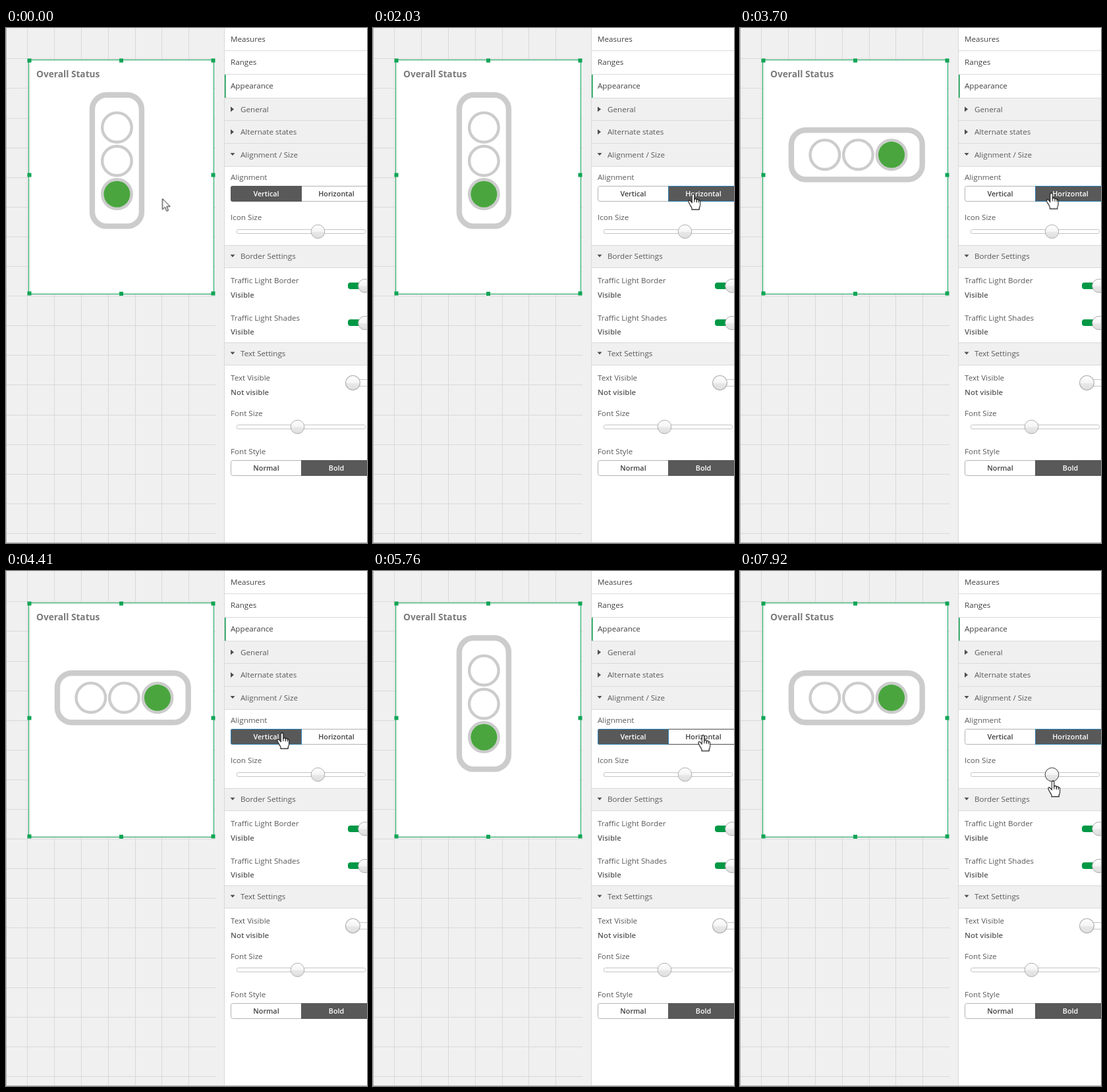
An HTML page for the animation above (8000 ms loop, 548 by 783 pixels).

```html
<!DOCTYPE html>
<html lang="en">
<head>
<meta charset="utf-8">
<title>Traffic light alignment</title>
<style>
html, body { margin: 0; width: 100%; height: 100%; overflow: hidden; background: #f0f0f0; }
svg { display: block; width: 548px; height: 783px; }
text { font: 11.65px "Open Sans", "Noto Sans", sans-serif; fill: #595959; }
.dark { fill: #404040; }
.strong { font-weight: 600; font-size: 11.4px; }
.title { font-weight: 700; font-size: 13.7px; fill: #7b7b7b; }
.btn text { font-weight: 600; font-size: 10.8px; text-anchor: middle; }
.btn .lit { fill: #fff; }
.line { fill: none; stroke: #d9d9d9; }
.band { fill: #f0f0f0; }
.box { fill: #fff; stroke: #b3b3b3; }
.fill { fill: #595959; }
.focus { fill: none; stroke: #2f83b5; }
.hover { fill: none; stroke: #4d4d4d; }
.track { fill: #fff; stroke: #c4c4c4; }
.on { fill: #009845; }
.green { fill: #4aa53f; }
.frame { fill: none; stroke: #ccc; stroke-width: 8.4; }
.lamp { fill: #fff; stroke: #ccc; stroke-width: 4.4; }

.tall, .wide, .v-on, .h-on, .v-focus, .v-hover, .h-hover, .knob-hover, .arrow, .hand {
  animation: 8s step-end infinite;
}
.tall { animation-name: tall; }
.wide { animation-name: wide; }
.v-on { animation-name: v-on; }
.h-on { animation-name: h-on; }
.v-focus { animation-name: v-focus; }
.v-hover { animation-name: v-hover; }
.h-hover { animation-name: h-hover; }
.knob-hover { animation-name: knob-hover; }
.arrow { animation-name: arrow; }
.hand { animation-name: hand; }
.cursor { animation: move 8s linear infinite; }

@keyframes tall { 0%, 58.875% { opacity: 1 } 27.25%, 79.125%, 100% { opacity: 0 } }
@keyframes wide { 0%, 58.875% { opacity: 0 } 27.25%, 79.125%, 100% { opacity: 1 } }
@keyframes v-on { 0%, 55.125% { opacity: 1 } 23.375%, 75.625%, 100% { opacity: 0 } }
@keyframes h-on { 0%, 55.125% { opacity: 0 } 23.375%, 75.625%, 100% { opacity: 1 } }
@keyframes v-focus { 0%, 75.625%, 100% { opacity: 0 } 55.125% { opacity: 1 } }
@keyframes v-hover { 0%, 55.125%, 100% { opacity: 0 } 49.8125% { opacity: 1 } }
@keyframes h-hover { 0%, 23.375%, 75.625%, 100% { opacity: 0 } 16.125%, 66.5625% { opacity: 1 } }
@keyframes knob-hover { 0% { opacity: 0 } 97.2%, 100% { opacity: 1 } }
@keyframes arrow { 0%, 88.175% { opacity: 1 } 7.0375%, 97.2%, 100% { opacity: 0 } }
@keyframes hand { 0%, 88.175% { opacity: 0 } 7.0375%, 97.2%, 100% { opacity: 1 } }

/* The pointer jumps between sampled places, at both ends of each move. */
@keyframes move {
  0% { transform: translate(237.5px, 259.5px) }
  1.625% { transform: translate(237.5px, 259.5px); animation-timing-function: steps(3, jump-both) }
  7.0375% { transform: translate(350px, 253px) }
  8.8375% { transform: translate(350px, 253px); animation-timing-function: steps(3, jump-both) }
  14.25% { transform: translate(443px, 257px) }
  16.125% { transform: translate(443px, 257px); animation-timing-function: steps(2, jump-both) }
  19.875% { transform: translate(486px, 252px) }
  46.25% { transform: translate(486px, 252px); animation-timing-function: steps(4, jump-both) }
  53.375% { transform: translate(419px, 246px) }
  64.75% { transform: translate(419px, 246px); animation-timing-function: steps(4, jump-both) }
  72% { transform: translate(501px, 249.5px) }
  86.375% { transform: translate(501px, 249.5px); animation-timing-function: steps(7, jump-both) }
  99%, 100% { transform: translate(475px, 319px) }
}
</style>
</head>
<body>
<svg viewBox="0 0 548 783">
  <defs>
    <linearGradient id="gloss" x2="0" y2="1">
      <stop offset="0" stop-color="#fff"/>
      <stop offset=".5" stop-color="#f4f4f4"/>
      <stop offset=".55" stop-color="#e8e8e8"/>
      <stop offset="1" stop-color="#dedede"/>
    </linearGradient>
    <circle id="knob" r="10.3" fill="url(#gloss)" stroke="#adadad"/>
    <rect id="handle" x="-3" y="-3" width="6" height="6" fill="#10a557"/>
    <path id="closed" d="M341 -4l5 4-5 4z" fill="#4d4d4d"/>
    <path id="open" d="M340.5 -2h7l-3.5 4z" fill="#4d4d4d"/>
    <circle id="lamp" class="lamp" r="22.3"/>
    <g id="lamp-on"><use href="#lamp"/><circle class="green" r="20.1"/></g>
  </defs>

  <!-- Sheet grid -->
  <rect width="548" height="783" fill="#f0f0f0"/>
  <path class="line" d="M32.5 0V782M73.5 0V782M114.5 0V782M155.5 0V782M196.5 0V782M236.5 0V782M277.5 0V782
    M0 46.5H318M0 91.5H318M0 137.5H318M0 182.5H318M0 227.5H318M0 272.5H318M0 317.5H318M0 362.5H318
    M0 407.5H318M0 452.5H318M0 497.5H318M0 542.5H318M0 588.5H318M0 633.5H318M0 678.5H318M0 723.5H318M0 768.5H318"/>

  <!-- Selected card -->
  <rect x="34" y="48" width="282" height="357" fill="#fff"/>
  <rect x="36.5" y="50.5" width="277" height="352" fill="none" stroke="#e3ebe6"/>
  <rect x="34.5" y="48.5" width="281" height="356" fill="none" stroke="#10a557"/>
  <use href="#handle" x="35.5" y="49.5"/><use href="#handle" x="175" y="49.5"/><use href="#handle" x="314.5" y="49.5"/>
  <use href="#handle" x="35.5" y="223.5"/><use href="#handle" x="314.5" y="223.5"/>
  <use href="#handle" x="35.5" y="403.5"/><use href="#handle" x="175" y="404"/><use href="#handle" x="314.5" y="403.5"/>
  <text class="title" x="46" y="75">Overall Status</text>

  <g class="tall">
    <rect class="frame" x="130.9" y="101.8" width="75" height="199.6" rx="22"/>
    <use href="#lamp" x="168.4" y="151.2"/>
    <use href="#lamp" x="168.4" y="202"/>
    <use href="#lamp-on" x="168.4" y="252.6"/>
  </g>
  <g class="wide">
    <rect class="frame" x="77.9" y="155.2" width="198.8" height="75" rx="22"/>
    <use href="#lamp" x="128.8" y="192.7"/>
    <use href="#lamp" x="179.4" y="192.7"/>
    <use href="#lamp-on" x="230" y="192.7"/>
  </g>

  <!-- Property panel -->
  <rect x="332" width="216" height="783" fill="#fff"/>
  <path class="band" d="M332 106h216v105H332zM332 330h216v35H332zM332 478h216v34H332z"/>
  <path class="line" d="M331.5 0V783M332 34.5h216M332 70.5h216M332 106.5h216M332 140.5h216M332 175.5h216
    M332 210.5h216M332 330.5h216M332 364.5h216M332 478.5h216M332 512.5h216"/>
  <rect class="on" x="332" y="71" width="1.5" height="35"/>

  <text class="dark" x="341" y="21">Measures</text>
  <text class="dark" x="341" y="56">Ranges</text>
  <text class="dark" x="341" y="92">Appearance</text>

  <use href="#closed" y="123.5"/><text x="356" y="128">General</text>
  <use href="#closed" y="158"/><text x="356" y="162">Alternate states</text>
  <use href="#open" y="192"/><text x="356" y="197">Alignment / Size</text>

  <text x="341" y="231">Alignment</text>
  <g class="btn">
    <path class="box" d="M448.5 240.5H344.5a3 3 0 0 0-3 3v17a3 3 0 0 0 3 3H448.5z"/>
    <rect class="box" x="448.5" y="240.5" width="108" height="23"/>
    <text class="dark" x="395" y="256">Vertical</text>
    <text class="dark" x="501.5" y="256">Horizontal</text>
    <g class="v-on">
      <path class="fill" d="M449 240H344a3 3 0 0 0-3 3v18a3 3 0 0 0 3 3H449z"/>
      <text class="lit" x="395" y="256">Vertical</text>
    </g>
    <g class="h-on">
      <rect class="fill" x="448" y="240" width="108" height="24"/>
      <text class="lit" x="501.5" y="256">Horizontal</text>
      <rect class="focus" x="448.5" y="240.5" width="108" height="23"/>
    </g>
    <path class="hover v-hover" d="M448.5 240.5H344.5a3 3 0 0 0-3 3v17a3 3 0 0 0 3 3H448.5z"/>
    <rect class="hover h-hover" x="448.5" y="240.5" width="108" height="23"/>
    <path class="focus v-focus" d="M448.5 240.5H344.5a3 3 0 0 0-3 3v17a3 3 0 0 0 3 3H448.5z"/>
  </g>

  <text x="341" y="291.5">Icon Size</text>
  <rect class="track" x="350.5" y="306.5" width="195" height="6" rx="2"/>
  <use href="#knob" x="473.5" y="309.5"/>
  <circle class="hover knob-hover" cx="473.5" cy="309.5" r="10.3"/>

  <use href="#open" y="346.5"/><text x="356" y="351">Border Settings</text>
  <text x="341" y="388">Traffic Light Border</text>
  <text class="strong" x="341" y="410">Visible</text>
  <rect class="on" x="519" y="387" width="40" height="10" rx="4"/>
  <use href="#knob" x="545" y="392"/>
  <text x="341" y="445">Traffic Light Shades</text>
  <text class="strong" x="341" y="466">Visible</text>
  <rect class="on" x="519" y="443" width="40" height="10" rx="4"/>
  <use href="#knob" x="545" y="448.5"/>

  <use href="#open" y="494.5"/><text x="356" y="499">Text Settings</text>
  <text x="341" y="536">Text Visible</text>
  <text class="strong" x="341" y="558">Not visible</text>
  <rect class="track" x="519.5" y="534.5" width="40" height="10" rx="4"/>
  <use href="#knob" transform="translate(526.5 539.5) scale(1.06)"/>

  <text x="341" y="590">Font Size</text>
  <rect class="track" x="350.5" y="603.5" width="195" height="6" rx="2"/>
  <use href="#knob" x="442.5" y="606.5"/>

  <text x="341" y="648">Font Style</text>
  <g class="btn">
    <path class="box" d="M448.5 657.5H344.5a3 3 0 0 0-3 3v17a3 3 0 0 0 3 3H448.5z"/>
    <rect class="fill" x="448" y="657" width="108" height="24"/>
    <text class="dark" x="395" y="673">Normal</text>
    <text class="lit" x="501.5" y="673">Bold</text>
  </g>

  <path d="M.5 0V783M0 782.5H548" fill="none" stroke="#b5b5b5"/>

  <!-- Pointer -->
  <g class="cursor" fill="#fff" stroke="#111" stroke-linejoin="round">
    <path class="arrow" d="M0 0v16.5l3.8-3.6 2.6 6 2.6-1.1-2.6-5.9h5.3z"/>
    <g class="hand">
      <g transform="scale(.88 1.09)" stroke-width="1.2">
        <path d="M-2 2a2 2 0 0 1 4 0v6q0-1 2-1 1.5 0 2 1.5 .5-.8 2-.6 1.4.2 1.6 1.5 2.4-.6 2.4 1.6v4.5q0 2-1.5 4V22H-2.5v-2.5l-5-7q-1.5-2.5 .5-3.2 1.5-.4 3 1.2l2 2z"/>
        <path d="M2 7v4.5M6 8.5v3.5M9.6 9.4v3" fill="none"/>
      </g>
    </g>
  </g>
</svg>
</body>
</html>
```
